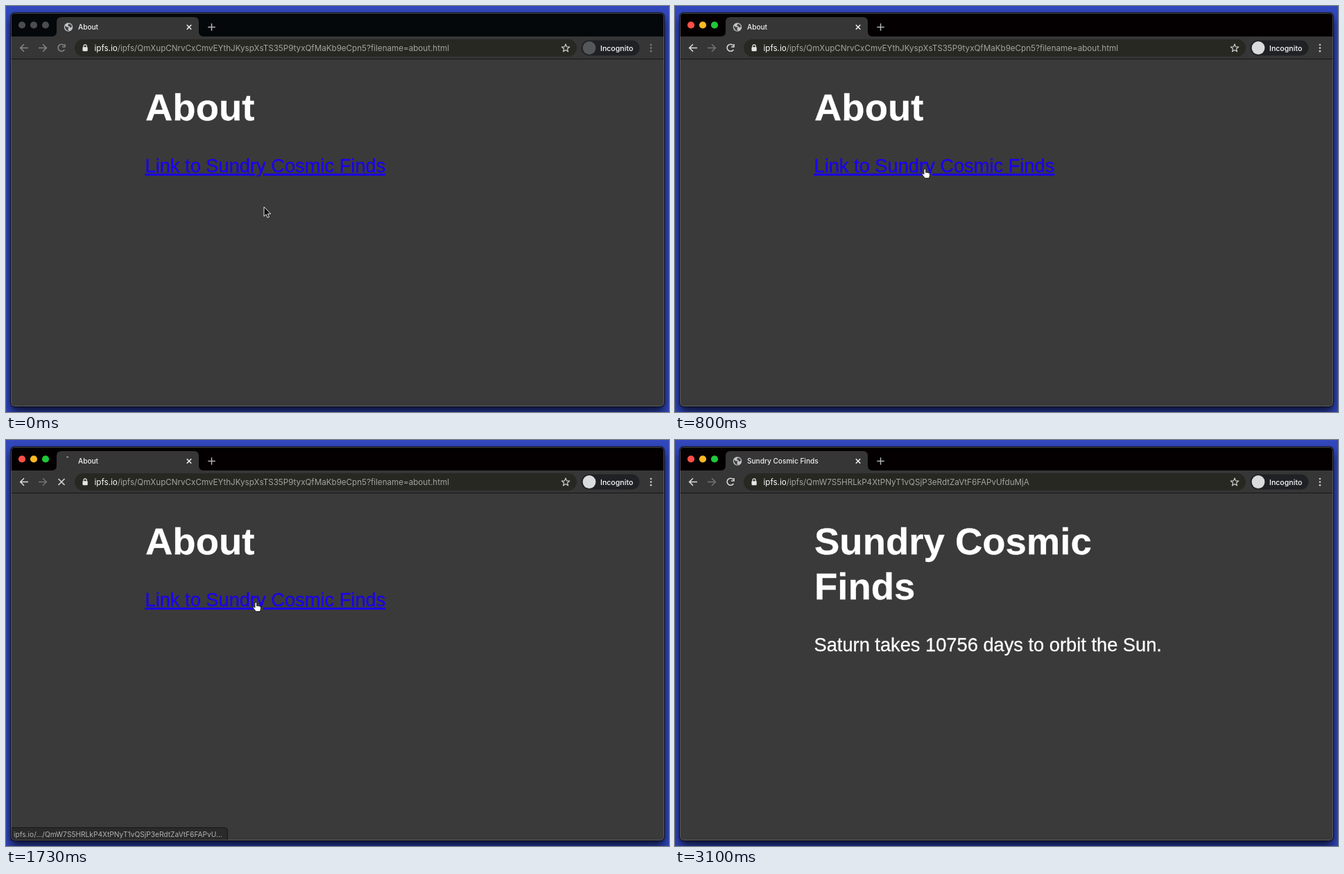
Animation of 956x586 px, one loop 3910 ms. Source, as an HTML page:

```html
<!DOCTYPE html>
<html lang="en">
<head>
<meta charset="utf-8">
<title>Browser demo</title>
<style>
html, body { margin: 0; width: 100%; height: 100%; overflow: hidden; background: #3248bc; }
svg { display: block; width: 956px; height: 586px; font-family: Inter, Roboto, sans-serif; }
.shadow { filter: drop-shadow(0 8px 7px rgba(0, 0, 10, .8)); }
.icon { fill: none; stroke-width: 1.6; }
.page { font: 27.25px "Liberation Sans", Arial, sans-serif; fill: #fff; stroke: #fff; stroke-width: .3; }
.page .head { font-weight: 700; font-size: 54.5px; }
.page .link { fill: #1a00f2; stroke: #1a00f2; text-decoration: underline; text-decoration-skip-ink: none; }
.url { font-size: 11.63px; fill: #a3a4a1; }
.url .host { fill: #fff; }
</style>
</head>
<body>
<svg viewBox="0 0 956 586">
  <rect width="956" height="586" fill="#3248bc"/>
  <rect class="shadow" x="7" y="10" width="942" height="568" rx="5"/>

  <!-- window -->
  <rect x="7" y="10" width="942" height="568" rx="5" fill="#3a3a3a"/>
  <path id="strip" d="M7 44V15a5 5 0 0 1 5-5H944a5 5 0 0 1 5 5V44Z"/>
  <path d="M7 44H66Q73 44 73 37V23Q73 16 80 16H271Q278 16 278 23V37Q278 44 285 44H949V76H7Z" fill="#363636"/>
  <path d="M7 76.5H949" stroke="#161616"/>
  <g id="lights"><circle cx="23" cy="27.5" r="5.1"/><circle cx="40" cy="27.5" r="5.1"/><circle cx="57" cy="27.5" r="5.1"/></g>

  <!-- tab -->
  <g id="globe">
    <circle cx="90" cy="30.5" r="6.2" fill="#c3c5c7"/>
    <path d="M85 28.5l3.2 2 2.3-.3-1 3.2 1.3 2.5-3.3-.8-2.4-3.3ZM90.5 25.4l3.5 1.5 1.2 3.2-2.4 1.1-1.5-2-2.2-.8Z" fill="#414345"/>
  </g>
  <path id="spinner" fill="none" stroke="#c3c5c7" stroke-width="1.3"/>
  <text id="tab" x="104" y="34" font-size="10.1" font-weight="500" fill="#f2f2f2"></text>
  <path d="M260.8 27.3l6.4 6.4m0-6.4l-6.4 6.4" stroke="#f2f2f2" stroke-width="1.5"/>
  <path d="M291.2 30.5h10.6m-5.3-5.3v10.6" stroke="#b4b4b4" stroke-width="1.5"/>

  <!-- toolbar -->
  <path id="back" class="icon" d="M32 60.5H20.8M26 55.2L20.7 60.5L26 65.8"/>
  <path id="forward" class="icon" d="M47 60.5H58.2M53 55.2L58.3 60.5L53 65.8"/>
  <g id="reload">
    <path class="icon" d="M84.3 63a5 5 0 1 1-.5-6.1"/>
    <path class="icon" d="M85 55v4h-4" stroke-width="1.8"/>
  </g>
  <path id="stop" class="icon" d="M75.5 56l9 9m0-9l-9 9" stroke="#dadada"/>
  <rect x="99" y="48" width="724" height="25" rx="12.5" fill="#272822"/>
  <rect x="110.5" y="59.2" width="7.2" height="6" rx="1" fill="#e6e6e6"/>
  <path d="M112 60V58a2.1 2.1 0 0 1 4.2 0V60" fill="none" stroke="#e6e6e6" stroke-width="1.2"/>
  <text class="url" x="127.5" y="65"><tspan class="host">ipfs.io</tspan>/ipfs/<tspan id="path"></tspan></text>
  <path id="star" fill="none" stroke="#d0d0d0" stroke-width="1.2" stroke-linejoin="round"/>
  <rect x="829.5" y="49.5" width="84" height="22" rx="11" fill="#202124"/>
  <circle id="badge" cx="841" cy="60.5" r="9.4"/>
  <text x="857" y="64.6" font-size="10.6" font-weight="500" fill="#fff">Incognito</text>
  <g id="dots"><circle cx="930" cy="56" r="1.35"/><circle cx="930" cy="60.6" r="1.35"/><circle cx="930" cy="65.2" r="1.35"/></g>

  <!-- pages -->
  <g id="about" class="page">
    <text class="head" x="201" y="165">About</text>
    <text class="link" x="200.5" y="240">Link to Sundry Cosmic Finds</text>
  </g>
  <g id="facts" class="page">
    <text class="head" x="201" y="165">Sundry Cosmic</text>
    <text class="head" x="201" y="230">Finds</text>
    <text x="200.5" y="305">Saturn takes 10756 days to orbit the Sun.</text>
  </g>

  <g id="status">
    <path d="M7.5 559.5H315.5a4 4 0 0 1 4 4V577.5H7.5Z" fill="#292a29" stroke="#171717"/>
    <text x="11" y="572.5" font-size="10.2" fill="#b2b3b1">ipfs.io/.../QmW7S5HRLkP4XtPNyT1vQSjP3eRdtZaVtF6FAPvU...</text>
  </g>
  <rect x="7.5" y="10.5" width="941" height="567" rx="5" fill="none" stroke="#6b6c70" stroke-opacity=".7"/>
  <rect x="6.5" y="9.5" width="943" height="569" rx="6" fill="none" stroke="#05070f" stroke-opacity=".8"/>

  <path id="arrow" d="M0 0V13.6L3.1 10.8L5.1 15.4L7.4 14.4L5.4 10H9.7Z" fill="#0a0a0a" stroke="#fff" stroke-width=".9"/>
  <path id="hand" d="M-1.4 1.2a1.4 1.4 0 0 1 2.8 0V5c.5-.7 1.9-.6 2.2.2.5-.5 1.7-.3 1.9.5.6-.4 1.6 0 1.6.9v2.6c0 1.5-.9 2.2-.9 3.8h-6.4c-.3-1.4-3.3-4.3-3.7-5.6-.3-1 .9-1.7 1.7-.9l.8.9z" fill="#fff" stroke="#111" stroke-width=".9"/>
</svg>
<script>
const LOOP = 3910, FOCUS = 100, OVER = 530, CLICK = 1590, SPIN = 1640, LOADED = 1900, LEAVE = 2130;
const $ = id => document.getElementById(id);
const show = (id, on) => $(id).style.display = on ? '' : 'none';
const paint = (id, prop, value) => $(id).setAttribute(prop, value);
const clamp = v => Math.max(0, Math.min(1, v));
const ramp = (t, a, b) => clamp((t - a) / (b - a));
const smooth = v => v * v * (3 - 2 * v);

// time, x, y of the pointer's hot spot
const route = [
  [0, 372, 290], [270, 370, 279.5], [530, 363, 246], [800, 360.3, 235.5],
  [1070, 360.3, 234.6], [2630, 360.3, 234.6], [3080, 400, 600], [LOOP, 400, 600]
];

function pointer(t) {
  const i = route.findIndex((k, n) => n && t <= k[0]);
  const [a, b] = [route[i - 1], route[i]];
  const raw = ramp(t, a[0], b[0]);
  const u = i < 3 ? raw : i === 3 ? 1 - (1 - raw) ** 2 : smooth(raw);
  return [1, 2].map(n => a[n] + (b[n] - a[n]) * u);
}

const starPoints = Array.from({ length: 10 }, (_, i) => {
  const r = i % 2 ? 2.6 : 6, a = i * Math.PI / 5;
  return `${807 + r * Math.sin(a)} ${61 - r * Math.cos(a)}`;
});
paint('star', 'd', `M${starPoints.join('L')}Z`);

function spinnerArc(t) {
  const r = 6.2, a = Math.max(0, t - SPIN) / 1320 * 2 * Math.PI;
  return `M90 ${30.5 - r}A${r} ${r} 0 0 0 ${90 - r * Math.sin(a)} ${30.5 - r * Math.cos(a)}`;
}

function draw(t) {
  const active = t >= FOCUS, loaded = t >= LOADED, loading = t >= CLICK && !loaded;
  const tint = active ? '#dadada' : '#858585';

  paint('strip', 'fill', active ? '#040001' : '#04080a');
  ['#ff4f47', '#fdb924', '#1fc83a'].forEach((c, i) =>
    $('lights').children[i].setAttribute('fill', active ? c : '#4b4c4d'));
  paint('back', 'stroke', tint);
  paint('reload', 'stroke', tint);
  paint('forward', 'stroke', active ? '#737373' : '#858585');
  paint('dots', 'fill', active ? '#c4c4c4' : '#7d7d7d');
  paint('badge', 'fill', active ? '#d9dbdd' : '#55585b');

  show('globe', !loading);
  show('spinner', loading);
  show('reload', !loading);
  show('stop', loading);
  paint('spinner', 'd', spinnerArc(t));
  $('tab').textContent = loaded ? 'Sundry Cosmic Finds' : 'About';
  $('path').textContent = loaded
    ? 'QmW7S5HRLkP4XtPNyT1vQSjP3eRdtZaVtF6FAPvUfduMjA'
    : 'QmXupCNrvCxCmvEYthJKyspXsTS35P9tyxQfMaKb9eCpn5?filename=about.html';
  show('about', !loaded);
  show('facts', loaded);
  $('status').style.opacity = ramp(t, 1090, 1200) * (1 - ramp(t, 2300, 2500));

  const over = t >= OVER && t < LEAVE;
  show('hand', over);
  show('arrow', !over);
  paint(over ? 'hand' : 'arrow', 'transform', `translate(${pointer(t)})`);
}

function tick() {
  draw(performance.now() % LOOP);
  requestAnimationFrame(tick);
}
tick();
</script>
</body>
</html>
```
